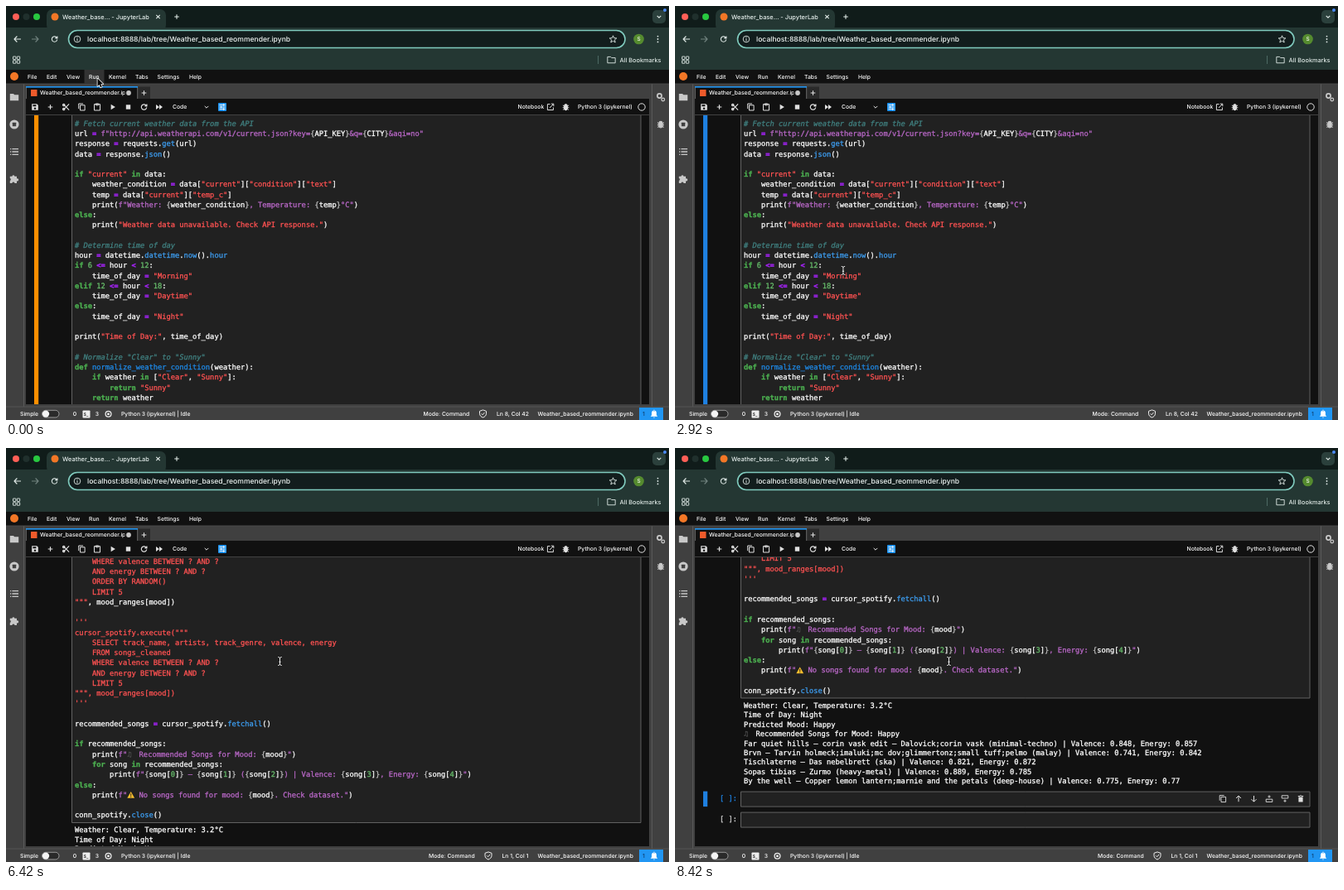
Animation of 800x500 px, one loop 8.5 s. Source, as an HTML page with a canvas:

```html
<!DOCTYPE html>
<html lang="en">
<head>
<meta charset="utf-8">
<title>Notebook session</title>
<style>
html, body { margin: 0; width: 100%; height: 100%; overflow: hidden; background: #111; }
canvas { display: block; width: 800px; height: 500px; }
</style>
</head>
<body>
<canvas id="stage" width="800" height="500"></canvas>
<script>
const ctx = document.getElementById('stage').getContext('2d');
const LOOP = 8500, FPS = 12;
const UI = 'Inter, "DejaVu Sans", sans-serif';
const MONO = '"DejaVu Sans Mono", monospace';
const CODE_SIZE = 8.74, CHAR = 5.262, LINE = 12.26, OUT_LINE = 11.45, EMOJI = 9.2;
const GREY = '#404040', ICON = '#e0e0e0', BLUE = '#1e80e0', ORANGE = '#f37726', RED = '#ff5252';
const TEAL = '#243733', MIST = '#dfe9e6';
const MENU_ON = 900, MENU_OFF = 2600, SELECT = 2900, RUN = 5420, OUTPUT = 5850;

const FIRST = `# Fetch current weather data from the API
url = f"http://api.weatherapi.com/v1/current.json?key={API_KEY}&q={CITY}&aqi=no"
response = requests.get(url)
data = response.json()

if "current" in data:
    weather_condition = data["current"]["condition"]["text"]
    temp = data["current"]["temp_c"]
    print(f"Weather: {weather_condition}, Temperature: {temp}°C")
else:
    print("Weather data unavailable. Check API response.")

# Determine time of day
hour = datetime.datetime.now().hour
if 6 <= hour < 12:
    time_of_day = "Morning"
elif 12 <= hour < 18:
    time_of_day = "Daytime"
else:
    time_of_day = "Night"

print("Time of Day:", time_of_day)

# Normalize "Clear" to "Sunny"
def normalize_weather_condition(weather):
    if weather in ["Clear", "Sunny"]:
        return "Sunny"
    return weather`.split('\n');

// A leading ~ marks a line inside a multi-line string.
const LAST = `~    WHERE valence BETWEEN ? AND ?
~    AND energy BETWEEN ? AND ?
~    ORDER BY RANDOM()
~    LIMIT 5
""", mood_ranges[mood])

'''
~cursor_spotify.execute("""
~    SELECT track_name, artists, track_genre, valence, energy
~    FROM songs_cleaned
~    WHERE valence BETWEEN ? AND ?
~    AND energy BETWEEN ? AND ?
~    LIMIT 5
~""", mood_ranges[mood])
'''

recommended_songs = cursor_spotify.fetchall()

if recommended_songs:
    print(f"♫ Recommended Songs for Mood: {mood}")
    for song in recommended_songs:
        print(f"{song[0]} – {song[1]} ({song[2]}) | Valence: {song[3]}, Energy: {song[4]}")
else:
    print(f"⚠ No songs found for mood: {mood}. Check dataset.")

conn_spotify.close()`.split('\n');

const RESULT = `Weather: Clear, Temperature: 3.2°C
Time of Day: Night
Predicted Mood: Happy
♫ Recommended Songs for Mood: Happy
Far quiet hills – corin vask edit – Dalovick;corin vask (minimal-techno) | Valence: 0.848, Energy: 0.857
Brvn – Tarvin holmeck;imaluki;mc dov;glimmertonz;small tuff;pelmo (malay) | Valence: 0.741, Energy: 0.842
Tischlaterne – Das nebelbrett (ska) | Valence: 0.821, Energy: 0.872
Sopas tibias – Zurmo (heavy-metal) | Valence: 0.889, Energy: 0.785
By the well – Copper lemon lantern;marnie and the petals (deep-house) | Valence: 0.775, Energy: 0.77`.split('\n');

// "-" is a separator, a leading ! is a disabled entry.
const EDIT_MENU = `Undo|⌘ Z
Redo|⇧ ⌘ Z
-
Undo Cell Operation|Z
Redo Cell Operation|⇧ Z
-
Cut Cell|X
Copy Cell|C
Paste Cell Below|V
Paste Cell Above
Paste Cell and Replace
-
Delete Cell|D, D
-
Select All Cells|⌘ A
Deselect All Cells
-
!Move Cell Up|⌃ ⇧ ↑
Move Cell Down|⌃ ⇧ ↓
-
Split Cell|⌃ ⇧ -
Merge Selected Cells|⇧ M
Merge Cell Above|⌃ ⌫
Merge Cell Below|⌃ ⇧ M
-
Clear Cell Output
Clear Outputs of All Cells
-
Find...|⌘ F
!Find Next|⌘ G
!Find Previous|⇧ ⌘ G
-
!Go to Line...`.split('\n');

const BAR = [['File', 26], ['Edit', 49], ['View', 73], ['Run', 100], ['Kernel', 124],
  ['Tabs', 156], ['Settings', 182.5], ['Help', 221], ['', 243]];

// time, x, y
const POINTER = [[0, 110.5, 87.5], [300, 110.5, 87.5], [700, 56, 87], [1000, 56, 87],
  [1850, 93, 383.3], [2350, 93, 383.3], [3300, 264, 284], [4050, 264, 284],
  [5050, 131.5, 118], [5600, 131.5, 118], [6200, 330.5, 257.5], [LOOP, 330.5, 257.5]];

const GLYPH = {
  save: 'M-3.8 -3.8H2.2L3.8 -2.2V3.8H-3.8ZM-2.6 -2.7V-.8H1.4V-2.7ZM0 .4A1.3 1.3 0 1 0 .01 .4Z',
  plus: 'M-2.8 0H2.8M0 -2.8V2.8',
  close: 'M-2.2 -2.2L2.2 2.2M2.2 -2.2L-2.2 2.2',
  cut: 'M-3.4 -3.6L3.6 3.6M-3.4 3.6L3.6 -3.6M-1.6 -2.6A1.2 1.2 0 1 1 -4 -2.6A1.2 1.2 0 1 1 -1.6 -2.6M-1.6 2.6A1.2 1.2 0 1 1 -4 2.6A1.2 1.2 0 1 1 -1.6 2.6',
  copy: 'M-3.8 2.2V-4H1.6M-2 -2.2H3.6V4H-2Z',
  paste: 'M-3.5 -3.4H3.5V4H-3.5ZM-1.7 -4H1.7V-2.2H-1.7Z',
  play: 'M-2.4 -3.3L2.9 0L-2.4 3.3Z',
  stop: 'M-2.7 -2.7H2.7V2.7H-2.7Z',
  reload: 'M2.9 -1.4A3.2 3.2 0 1 0 3.2 .5M3.4 -3.6V-1.1H.9',
  forward: 'M-4 -3L0 0L-4 3ZM0 -3L4 0L0 3Z',
  down: 'M-2.3 -1.1L0 1.2L2.3 -1.1',
  open: 'M-.5 -3.4H-3.6V3.6H3.4V.5M.9 -3.8H3.8V-.9M3.6 -3.6L-1 1',
  bug: 'M-2 -1.6H2V2A2 2 0 0 1 -2 2ZM-1.8 -1.8A1.8 1.8 0 0 1 1.8 -1.8M-3.8 -2.2L-2 -1M3.8 -2.2L2 -1M-4 .7H4M-3.6 3.6L-2 2.3M3.6 3.6L2 2.3',
  folder: 'M-5.2 -4H-1L.2 -2.7H5.2V4.2H-5.2Z',
  list: 'M-2.6 -3.4H5M-2.6 0H5M-2.6 3.4H5M-5 -3.4H-3.8M-5 0H-3.8M-5 3.4H-3.8',
  puzzle: 'M-4.8 -3.2H-2.2A1.5 1.5 0 1 1 .8 -3.2H3.4V-.6A1.6 1.6 0 1 1 3.4 2.4V5H.9A1.6 1.6 0 0 0 -2.3 5H-4.8V2A1.6 1.6 0 0 0 -4.8 -1Z',
  back: 'M4 0H-4M-.6 -3.5L-4 0L-.6 3.5',
  next: 'M-4 0H4M.6 -3.5L4 0L.6 3.5',
  star: 'M0 -4.2L1.2 -1.3L4.3 -1.1L1.9 .9L2.7 4L0 2.3L-2.7 4L-1.9 .9L-4.3 -1.1L-1.2 -1.3Z',
  shield: 'M0 -4.4L4 -3V0C4 2.4 2 4 0 4.7C-2 4 -4 2.4 -4 0V-3ZM-1.8 0L-.4 1.5L2 -1.4',
  bell: 'M-4.2 3.2L-2.9 1.6V-1.2A2.9 2.9 0 0 1 2.9 -1.2V1.6L4.2 3.2ZM-1.2 4.2A1.3 1.3 0 0 0 1.2 4.2ZM-.7 -4.7H.7V-3H-.7Z',
  up: 'M0 3.6V-3.4M-3 -.6L0 -3.6L3 -.6',
  drop: 'M0 -3.6V3.4M-3 .6L0 3.6L3 .6',
  above: 'M-3.8 .6H3.8V3.8H-3.8ZM0 -1V-4.2M-1.6 -2.6H1.6',
  below: 'M-3.8 -3.8H3.8V-.6H-3.8ZM0 1V4.2M-1.6 2.6H1.6',
  bin: 'M-2.6 -2H2.6V4H-2.6ZM-3.2 -3.6H3.2V-2.6H-3.2ZM-1 -4.2H1V-3H-1Z',
  arrow: 'M0 0V9.4L2.1 7.4L3.6 10.8L5.2 10.1L3.7 6.8H6.7Z',
  beam: 'M-2.2 -5Q0 -5 0 -3.6Q0 -5 2.2 -5M0 -3.6V3.6M-2.2 5Q0 5 0 3.6Q0 5 2.2 5M-1.1 .8H1.1'
};
for (const k in GLYPH) GLYPH[k] = new Path2D(GLYPH[k]);

function rect(x, y, w, h, color) {
  ctx.fillStyle = color;
  ctx.fillRect(x, y, w, h);
}
function box(x, y, w, h, r, fill, line, width = 1) {
  ctx.beginPath();
  ctx.roundRect(x, y, w, h, r);
  if (fill) { ctx.fillStyle = fill; ctx.fill(); }
  if (line) { ctx.strokeStyle = line; ctx.lineWidth = width; ctx.stroke(); }
}
function disc(x, y, r, fill, line, width = 1) {
  box(x - r, y - r, 2 * r, 2 * r, r, fill, line, width);
}
function draw(name, x, y, color, width = 0, scale = 1) {
  ctx.save();
  ctx.translate(x, y);
  ctx.scale(scale, scale);
  ctx.fillStyle = ctx.strokeStyle = color;
  ctx.lineWidth = width;
  if (width) ctx.stroke(GLYPH[name]); else ctx.fill(GLYPH[name], 'evenodd');
  ctx.restore();
}
function label(s, x, y, size = 6.8, color = '#fff', align = 'left') {
  ctx.font = `500 ${size}px ${UI}`;
  ctx.textAlign = align;
  ctx.fillStyle = color;
  ctx.fillText(s, x, y + size * .36);
}
function clipped(x, y, w, h, paint) {
  ctx.save();
  ctx.beginPath();
  ctx.rect(x, y, w, h);
  ctx.clip();
  paint();
  ctx.restore();
}

function warning(x, y) {
  ctx.fillStyle = '#fbc02d';
  ctx.beginPath();
  ctx.moveTo(x + 4.6, y - 4);
  ctx.lineTo(x + 9, y + 3.8);
  ctx.lineTo(x + .2, y + 3.8);
  ctx.fill();
  rect(x + 4.1, y - 1.6, 1, 3, '#222');
  rect(x + 4.1, y + 2, 1, 1, '#222');
}
// Draws fixed-pitch text, slightly thickened, and returns the x where it ends.
function mono(s, x, y, color = '#fff', style = '') {
  ctx.font = `${style} ${CODE_SIZE}px ${MONO}`;
  ctx.textAlign = 'left';
  ctx.lineWidth = .3;
  for (const c of s) {
    ctx.fillStyle = ctx.strokeStyle = c === '♫' ? '#4c4c4c' : color;
    if (c === '⚠') warning(x, y);
    else if (c !== ' ') {
      ctx.fillText(c, x, y + 2.8);
      ctx.strokeText(c, x, y + 2.8);
    }
    x += c === '♫' || c === '⚠' ? EMOJI : CHAR;
  }
  return x;
}

const TOKEN = /(#.*)|(f"[^"]*")|("""|'''|"[^"]*")|\b(if|in|elif|else|def|return|for)\b|((?<=def )\w+)|((?<=\.)[a-z_]\w*)|(\b\d+\b)|([=<>]+)|\w+|\s+|./g;
const LOOK = [null, ['#408080', 'italic'], null, [RED], ['#4caf50', 'bold'], ['#1e88e5'],
  ['#3d9df0'], ['#66bb6a'], ['#aa22ff', 'bold']];

function code(s, x, y) {
  if (s[0] === '~') return mono(s.slice(1), x, y, RED);
  for (const m of s.matchAll(TOKEN)) {
    if (m[2]) {
      for (const part of m[2].split(/(\{[^}]*\})/)) {
        if (part[0] === '{') {
          x = mono('{', x, y, '#bdbdbd');
          x = code(part.slice(1, -1), x, y);
          x = mono('}', x, y, '#bdbdbd');
        } else x = mono(part, x, y, '#ba68c8');
      }
    } else {
      const kind = LOOK.findIndex((v, i) => v && m[i]);
      x = kind < 0 ? mono(m[0], x, y) : mono(m[0], x, y, ...LOOK[kind]);
    }
  }
  return x;
}

function pointerAt(t) {
  const i = Math.max(1, POINTER.findIndex(k => k[0] >= t));
  const [t0, x0, y0] = POINTER[i - 1], [t1, x1, y1] = POINTER[i];
  const p = (t - t0) / (t1 - t0), e = p * p * (3 - 2 * p);
  return [x0 + (x1 - x0) * e, y0 + (y1 - y0) * e];
}

function browser() {
  rect(0, 0, 800, 27, '#101c1a');
  rect(0, 26, 800, 51, TEAL);
  disc(12, 13, 4, '#ff5f57');
  disc(24.5, 13, 4, '#20302d');
  disc(37, 13, 4, '#28c840');
  box(49, 4, 144, 26, 7, TEAL);
  disc(59, 13, 4.5, ORANGE);
  label('Weather_base... - JupyterLab', 68, 13, 7.4, '#e6efed');
  draw('close', 183.5, 13, MIST, 1.1);
  draw('plus', 206, 13, MIST, 1.1);
  box(780, 5, 16, 16, 5, '#2b403c');
  draw('down', 788, 13, MIST, 1.2);
  disc(795, 5, 2, '#4c8bf5');

  draw('back', 14, 40, MIST, 1.1);
  draw('next', 35, 40, '#71837f', 1.1);
  draw('reload', 58.5, 40, MIST, 1.1);
  box(75.5, 29.5, 671.5, 21, 10.5, '#121d1d', '#80cbbe', 1.6);
  disc(86, 40, 3.8, null, MIST, .9);
  rect(85.5, 39.5, 1, 2.8, MIST);
  rect(85.5, 37.6, 1, 1, MIST);
  label('localhost:8888/lab/tree/Weather_based_reommender.ipynb', 98, 40.3, 8.58, '#eef4f2');
  draw('star', 732.5, 40, MIST, .9);
  disc(763.5, 40, 6.3, '#558b2f');
  label('S', 763.5, 40, 6.5, '#fff', 'center');
  for (const y of [36.6, 40, 43.4]) disc(786.5, y, .9, MIST);

  for (const x of [8.5, 13.3]) for (const y of [61, 65.8]) box(x, y, 3.4, 3.4, .3, null, MIST, .9);
  rect(714, 60, 1, 10, '#4e6a64');
  draw('folder', 730.5, 65, MIST, 1, .9);
  label('All Bookmarks', 740.5, 65, 7.3, MIST);
}

function menuBar(open, px, py) {
  rect(0, 77, 800, 17, '#111');
  rect(0, 93.5, 800, 1, '#4a4a4a');
  disc(10, 85, 5, ORANGE);
  BAR.slice(0, -1).forEach(([name, x], i) => {
    const end = BAR[i + 1][1] - 5.5;
    const over = py > 77 && py < 94 && px >= x - 5.5 && px < end;
    if (open && name === 'Edit') {
      rect(x - 5.5, 77, end - x + 5.5, 18, '#5a5a5a');
      rect(x - 4.5, 78, end - x + 3.5, 17, '#111');
    } else if (over) rect(x - 5.5, 77, end - x + 5.5, 17, '#333');
    label(name, x, 85.5);
  });
}

function frame() {
  rect(0, 94, 800, 406, GREY);
  rect(21, 94, 1, 390, '#5a5a5a');
  rect(779, 94, 1, 390, '#5a5a5a');
  draw('folder', 10, 110, '#c8c8c8');
  disc(10, 143, 5.6, '#c8c8c8');
  box(7.8, 140.8, 4.4, 4.4, .4, GREY);
  draw('list', 10, 176, '#c8c8c8', 1.3);
  draw('puzzle', 9.6, 209, '#c8c8c8');
  disc(788.5, 108.5, 2.6, null, '#c8c8c8', 1.7);
  disc(792.8, 113, 1.8, null, '#c8c8c8', 1.3);
  draw('bug', 790, 143, '#c8c8c8');
  draw('bug', 790, 143, '#c8c8c8', 1.2);

  rect(24, 112, 752, 369, '#111');
  box(24.5, 97.5, 134, 15, 0, '#111', '#5a5a5a');
  rect(24, 97, 135, 1.6, '#2196f3');
  box(30, 101, 7.5, 8, .5, '#ef5b2b');
  clipped(40, 98, 103.5, 14, () => label('Weather_based_reommender.ipynb', 41, 105));
  disc(148, 105, 2.9, '#c8c8c8');
  box(159.5, 97.5, 14.5, 15, 0, '#2a2a2a');
  draw('plus', 166.5, 105, ICON, 1);
}

function toolbar(px, py) {
  rect(24, 112, 752, 19, '#111');
  rect(24, 131, 752, 1, '#424242');
  if (Math.hypot(px - 129, py - 119) < 9) box(121, 114, 16, 16, 1, '#424242');
  draw('save', 35, 122, ICON);
  draw('plus', 53.5, 122, ICON, 1.2);
  draw('cut', 72.5, 122, ICON, 1.1);
  draw('copy', 91.5, 122, ICON, 1);
  draw('paste', 110, 122, ICON, 1);
  draw('play', 129, 122, ICON);
  draw('stop', 147.5, 122, ICON);
  draw('reload', 166.5, 122, ICON, 1.2);
  draw('forward', 185, 122, ICON);
  label('Code', 201, 122);
  draw('down', 242, 122, ICON, 1);
  box(256, 117, 10, 10, 1, '#2196f3');
  [119.5, 122, 124.5].forEach((y, i) => {
    rect(257.5, y - .4, 7, .9, '#fff');
    rect(i % 2 ? 259 : 262, y - 1.1, 1.2, 2.2, '#fff');
  });
  label('Notebook', 617.5, 122);
  draw('open', 657, 122, ICON, 1);
  draw('bug', 675.5, 122, ICON);
  draw('bug', 675.5, 122, ICON, 1, .95);
  label('Python 3 (ipykernel)', 690, 122);
  disc(767, 122, 4.2, null, ICON, 1);
}

function statusBar(ran) {
  rect(0, 484, 800, 16, GREY);
  rect(0, 483.5, 800, 1, '#555');
  label('Simple', 17, 492.5);
  box(43.5, 488.3, 20.5, 8.6, 4.3, '#2a2a2a', '#b0b0b0', .8);
  disc(48, 492.6, 4.2, '#f5f5f5');
  label('0', 83, 492.5, 6.8, '#fff', 'center');
  box(92.5, 488.5, 9, 9, .8, '#eee');
  label('$_', 93.6, 492.7, 5.2, '#222');
  label('3', 110, 492.5, 6.8, '#fff', 'center');
  disc(123.5, 492.7, 3.4, null, '#eee', 1.3);
  box(122.2, 491.4, 2.6, 2.6, .3, '#eee');
  label('Python 3 (ipykernel) | Idle', 139, 492.5);
  const shift = ran ? 6.5 : 0;
  label('Mode: Command', 503.5 + shift, 492.5);
  draw('shield', 575.5 + shift, 492.3, '#eee', 1);
  label(ran ? 'Ln 1, Col 1' : 'Ln 8, Col 42', 592 + shift, 492.5);
  label('Weather_based_reommender.ipynb', 641.5, 492.5);
  rect(764, 485, 29, 15, '#2196f3');
  label('1', 769.5, 492.5, 6.8, '#0d3a66', 'center');
  draw('bell', 782, 492.5, '#fff');
}

function emptyCell(y, active) {
  box(79.5, y + .5, 686.5, 18, 0, '#212121', '#616161');
  mono('[ ]:', 54, y + 9, active ? BLUE : '#d0d0d0');
  if (!active) return;
  rect(34, y, 5.2, 18.5, BLUE);
  draw('copy', 661, y + 9, ICON, .9);
  draw('up', 680, y + 9, ICON, 1);
  draw('drop', 698.5, y + 9, ICON, 1);
  draw('above', 717, y + 9, ICON, .9);
  draw('below', 736, y + 9, ICON, .9);
  draw('bin', 755, y + 9, ICON);
}

function codeBefore(t) {
  rect(34, 131, 5.2, 350, t < SELECT ? '#ff8f00' : BLUE);
  box(79.5, 120, 686.5, 370, 0, '#212121', '#616161');
  FIRST.forEach((s, i) => code(s, 83, 142 + i * LINE));
}

function codeAfter(t) {
  const p = Math.min(1, Math.max(0, (t - 6600) / 1147));
  const scroll = 150.5 * (1 - (1 - p) ** 2);
  const base = 443.5 - scroll;
  box(79.5, 100, 686.5, base + 9 - 100, 0, '#212121', '#616161');
  LAST.forEach((s, i) => code(s, 83, base - (LAST.length - 1 - i) * LINE));
  const done = t >= OUTPUT;
  if (done) RESULT.forEach((s, i) => mono(s, 83, base + 17.9 + i * OUT_LINE));
  const top = base + (done ? 121.6 : 18);
  emptyCell(top, true);
  emptyCell(top + 25, false);
  if (p > 0) {
    ctx.globalAlpha = Math.min(1, Math.max(0, (8250 - t) / 250));
    box(769.5, 360 + (scroll - 112.5) * .163, 4.6, 57, 2.3, '#757575');
    ctx.globalAlpha = 1;
  }
}

function editMenu(px, py) {
  clipped(43, 94, 159, 405, () => {
    box(44.5, 93.5, 156.5, 405, 0, '#111', '#5a5a5a');
    let y = 95.5;
    for (const row of EDIT_MENU) {
      if (row === '-') {
        rect(45, y + 2.4, 155.5, .8, '#4a4a4a');
        y += 5.6;
        continue;
      }
      if (py >= y && py < y + 15 && px > 44 && px < 201) rect(45, y, 155.5, 15, '#424242');
      const off = row[0] === '!';
      const [name, keys] = row.replace('!', '').split('|');
      const color = off ? '#5c5c5c' : '#fff';
      label(name, 62, y + 7.5, 6.8, color);
      if (keys) label(keys, 187.5, y + 7.5, 6.8, color, 'right');
      y += 15;
    }
    rect(44, 498, 157, 1, '#5a5a5a');
  });
}

function pointer(x, y, open) {
  if (!open && y > 131 && x > 79) {
    draw('beam', x, y, '#111', 2.2);
    draw('beam', x, y, '#f2f2f2', 1);
  } else {
    draw('arrow', x, y, '#fff', 1.6);
    draw('arrow', x, y, '#000');
  }
}

function paint(now) {
  const step = Math.floor((now % LOOP) * FPS / 1000 + .05);
  const t = Math.min(LOOP, step * 1000 / FPS);
  const [px, py] = pointerAt(t);
  const open = t >= MENU_ON && t < MENU_OFF;
  const ran = t >= RUN;
  ctx.textRendering = 'geometricPrecision';
  ctx.lineJoin = 'round';
  browser();
  frame();
  clipped(24, 131, 752, 350, () => ran ? codeAfter(t) : codeBefore(t));
  toolbar(px, py);
  statusBar(ran);
  menuBar(open, px, py);
  if (open) editMenu(px, py);
  pointer(px, py, open);
}

const start = performance.now();
function tick() {
  paint(performance.now() - start);
  requestAnimationFrame(tick);
}
tick();
</script>
</body>
</html>
```
